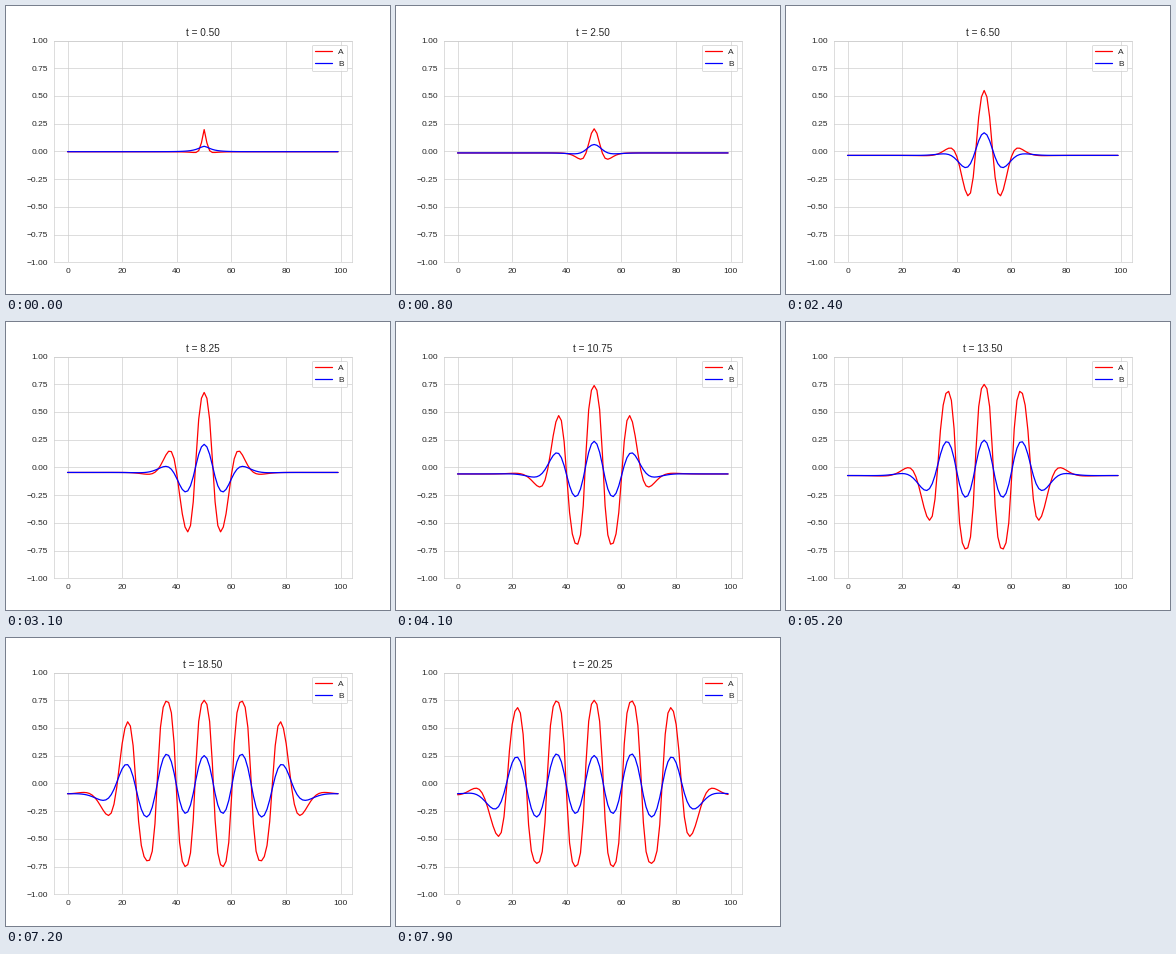
Recreate the animation shown at these times as a matplotlib script. Size 384 by 288 pixels, loop 8000 ms.

```python
import numpy as np
import matplotlib.pyplot as plt
from matplotlib.animation import FuncAnimation

# Reaction-diffusion system on a ring of cells
CELLS = 100
DIFF_A, DIFF_B = 1, 100
ALPHA, BETA = -0.005, 10
DT = 0.001
STEPS = 250          # solver steps per frame
FRAMES = 80
T0 = 0.5


def laplacian(u):
    return np.roll(u, 1) + np.roll(u, -1) - 2 * u


def advance(a, b, steps):
    for _ in range(steps):
        da = DIFF_A * laplacian(a) + a - a**3 - b + ALPHA
        db = DIFF_B * laplacian(b) + BETA * (a - b)
        a, b = a + DT * da, b + DT * db
    return a, b


def simulate():
    a, b = np.zeros(CELLS), np.zeros(CELLS)
    a[CELLS // 2] = 0.3
    a, b = advance(a, b, round(T0 / DT))
    states = [(a, b)]
    while len(states) < FRAMES:
        states.append(advance(*states[-1], STEPS))
    return states


plt.rcParams.update({
    "font.family": "Liberation Sans",
    "text.color": ".15",
    "xtick.color": ".15",
    "ytick.color": ".15",
    "xtick.bottom": False,
    "ytick.left": False,
    "axes.edgecolor": ".8",
    "axes.axisbelow": True,
    "axes.grid": True,
    "grid.color": ".8",
    "lines.solid_capstyle": "round",
})

states = simulate()
fig, ax = plt.subplots(figsize=(6.4, 4.8), dpi=60)
line_a, = ax.plot(states[0][0], color="red", label="A")
line_b, = ax.plot(states[0][1], color="blue", label="B")
ax.set_ylim(-1, 1)
ax.legend(loc="upper right")
title = ax.set_title("")


def draw(i):
    a, b = states[i]
    line_a.set_ydata(a)
    line_b.set_ydata(b)
    title.set_text(f"t = {T0 + i * STEPS * DT:.2f}")
    return line_a, line_b, title


anim = FuncAnimation(fig, draw, frames=FRAMES, interval=100, repeat=True)
plt.show()
```
